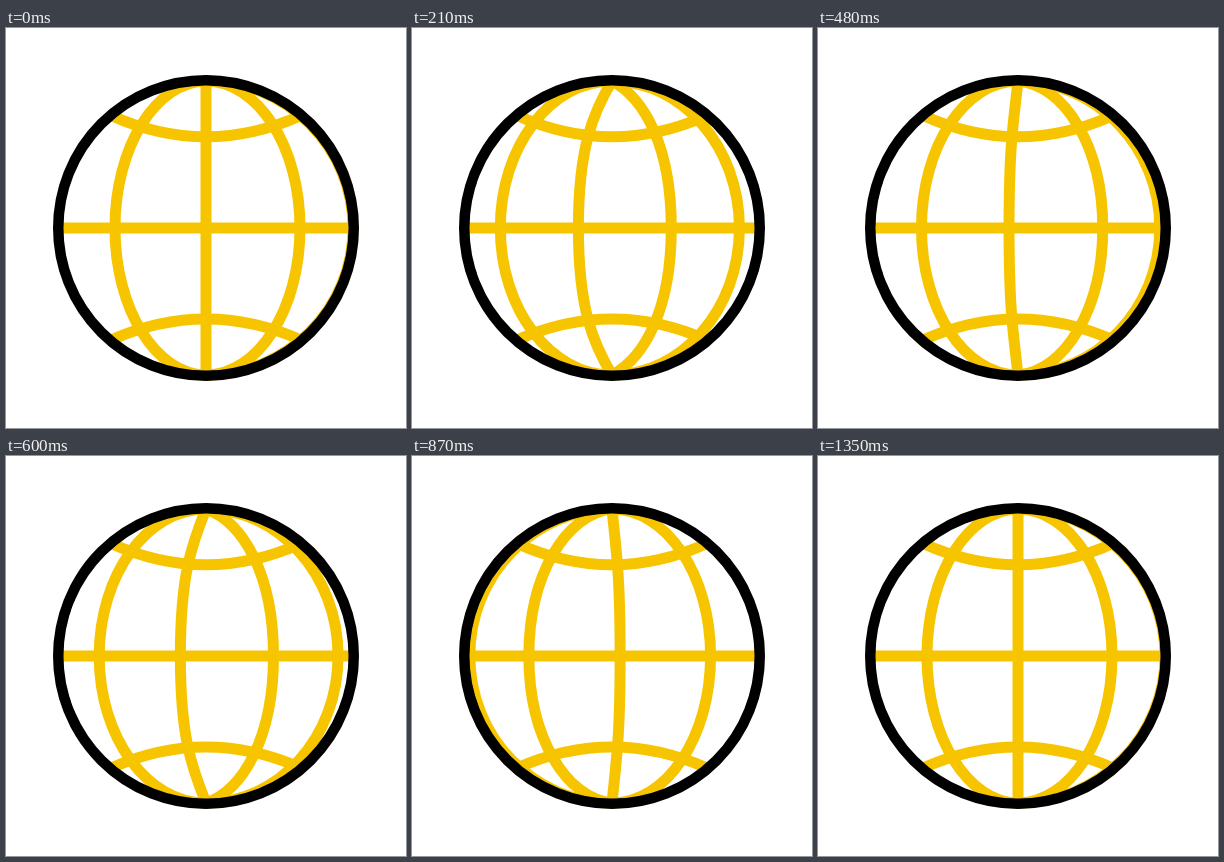
Animation, 400 px wide and 400 px high, one loop 1.91 s. Source, as an HTML page:

```html
<!DOCTYPE html>
<html lang="en">
<head>
<meta charset="utf-8">
<title>Spinning globe</title>
<style>
  html, body { margin: 0; width: 100%; height: 100%; overflow: hidden; background: #fff; }
  svg { display: block; width: 100vw; height: 100vh; }
  path, circle { fill: none; }
  .grid { stroke: #f7c500; stroke-width: 11; }
  .rim { stroke: #000; stroke-width: 10.5; }
</style>
</head>
<body>
<svg viewBox="0 0 400 400">
  <g class="grid">
    <path d="M53 200H347"/>
    <path d="M105 87.5Q200 130 295 87.5"/>
    <path d="M105 312Q200 270 295 312"/>
    <g id="meridians"></g>
  </g>
  <circle class="rim" cx="200" cy="200" r="147.75"/>
</svg>
<script>
const LOOP = 1910, SPIN = 1350, STEP = 30;
const TURNS = 7;                        // meridian gaps travelled per spin
const STOPS = [53, 109, 200, 294, 347]; // equator crossings at rest
const C = 200, RY = 147, KAPPA = 0.5523;

const group = document.getElementById('meridians');
const lines = STOPS.slice(1).map(() =>
  group.appendChild(document.createElementNS('http://www.w3.org/2000/svg', 'path')));

// Cubic easing with end handles (x1, 0) and (x2, 1).
function ease(t, x1 = 0.09, x2 = 0.42) {
  let lo = 0, hi = 1;
  for (let i = 0; i < 30; i++) {
    const s = (lo + hi) / 2, r = 1 - s;
    const x = 3 * x1 * s * r * r + 3 * x2 * s * s * r + s * s * s;
    if (x < t) lo = s; else hi = s;
  }
  return lo * lo * (3 - 2 * lo);
}

// Blends from a straight line at the centre to a half ellipse.
function meridian(x) {
  const dx = x - C;
  const bend = Math.min(1, Math.abs(dx) / 92);
  const hx = C + dx * KAPPA;
  const hy = 49 * (1 - bend);
  const my = RY * KAPPA;
  const top = C - RY, bottom = C + RY;
  return `M${C} ${top}C${hx} ${top + hy} ${x} ${C - my} ${x} ${C}` +
         `C${x} ${C + my} ${hx} ${bottom - hy} ${C} ${bottom}`;
}

function draw(ms) {
  const t = Math.min(1, Math.floor(ms / STEP) * STEP / SPIN);
  const left = t < 1 ? TURNS * (1 - ease(t)) : 0;
  const back = left % 1;
  lines.forEach((line, i) => {
    const x = STOPS[i + 1] - back * (STOPS[i + 1] - STOPS[i]);
    line.setAttribute('d', meridian(x));
  });
}

const start = performance.now();
function tick() {
  draw((performance.now() - start) % LOOP);
  requestAnimationFrame(tick);
}
tick();
</script>
</body>
</html>
```
